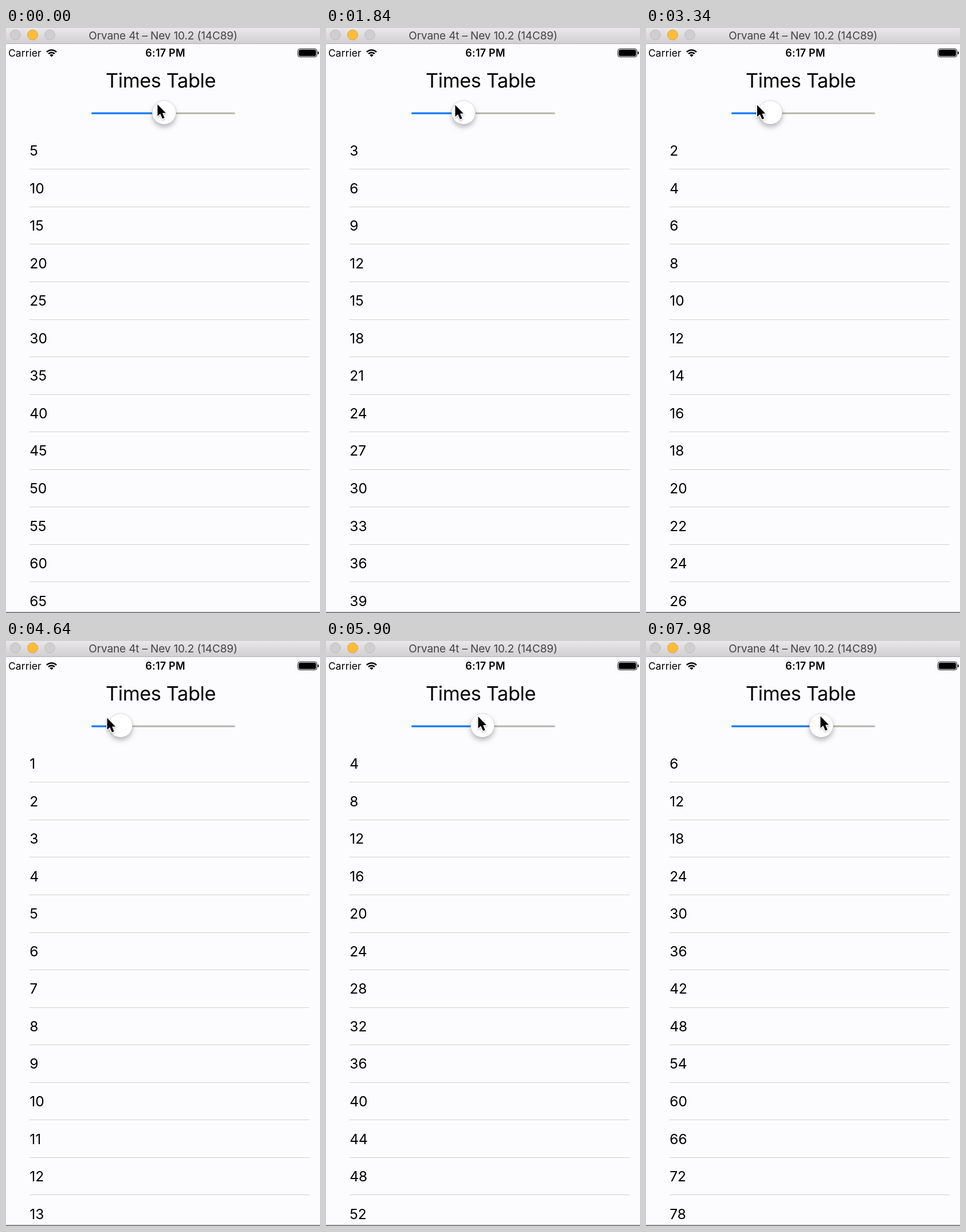
An HTML page with a canvas that plays this animation: 548x1022 px, repeating every 8 s.

```html
<!DOCTYPE html>
<html lang="en">
<head>
<meta charset="utf-8">
<title>Times Table</title>
<style>
html, body { margin: 0; width: 100%; height: 100%; overflow: hidden; background: #fcfcfe; }
canvas { display: block; }
</style>
</head>
<body>
<canvas id="stage" width="548" height="1022"></canvas>
<script>
const ctx = document.getElementById('stage').getContext('2d');
const LOOP = 8000;
const TRACK = { left: 149, right: 400, y: 149 };
const THUMB_R = 21;

// time, thumb centre, pointer x, pointer y
const KEYS = [
  [0, 276, 264.5, 133.5],
  [1840, 240, 225.5, 134.5],
  [3340, 217, 194, 134.5],
  [4640, 200, 176.5, 134.5],
  [5900, 273, 265.5, 132],
  [6980, 297, 295.5, 130.5],
  [7980, 306, 304.5, 131.5]
];

const slope = (i, col) => (KEYS[i + 1][col] - KEYS[i][col]) / (KEYS[i + 1][0] - KEYS[i][0]);

function tangent(i, col) {
  if (i === 0) return slope(0, col);
  if (i === KEYS.length - 1) return slope(i - 1, col);
  const a = slope(i - 1, col), b = slope(i, col);
  return a * b > 0 ? 2 * a * b / (a + b) : 0;
}

// Monotone cubic through the keys
function track(t, col) {
  const last = KEYS.length - 1;
  if (t >= KEYS[last][0]) return KEYS[last][col];
  let i = 0;
  while (t >= KEYS[i + 1][0]) i++;
  const h = KEYS[i + 1][0] - KEYS[i][0], u = (t - KEYS[i][0]) / h, v = 1 - u;
  return KEYS[i][col] * (1 + 2 * u) * v * v + KEYS[i + 1][col] * u * u * (3 - 2 * u)
    + h * (tangent(i, col) * u * v * v - tangent(i + 1, col) * u * u * v);
}

function text(str, x, y, size, { align = 'left', color = '#000', weight = 400, spacing = 0 } = {}) {
  ctx.font = `${weight} ${size}px Inter, Roboto, sans-serif`;
  ctx.letterSpacing = spacing + 'px';
  ctx.textAlign = align;
  ctx.fillStyle = color;
  ctx.fillText(str, x, y);
}

function rect(x, y, w, h, color) {
  ctx.fillStyle = color;
  ctx.fillRect(x, y, w, h);
}

function rounded(x, y, w, h, r) {
  ctx.beginPath();
  ctx.roundRect(x, y, w, h, r);
}

function disc(x, y, r, fill, stroke) {
  ctx.beginPath();
  ctx.arc(x, y, r, 0, 2 * Math.PI);
  ctx.fillStyle = fill;
  ctx.fill();
  if (!stroke) return;
  ctx.strokeStyle = stroke;
  ctx.lineWidth = 1;
  ctx.stroke();
}

function titleBar() {
  const shade = ctx.createLinearGradient(0, 0, 0, 27);
  shade.addColorStop(0, '#e9e7e9');
  shade.addColorStop(1, '#d1cfd1');
  rect(0, 0, 548, 27, shade);
  rect(0, 27, 548, 1, '#b3b1b3');
  disc(16.5, 12, 8.8, '#d0ced0', '#bcbabc');
  disc(46.5, 12, 8.8, '#fdbc38', '#e2a234');
  disc(76.5, 12, 8.8, '#d0ced0', '#bcbabc');
  text('Orvane 4t – Nev 10.2 (14C89)', 274, 19.5, 19, { align: 'center', color: '#444', spacing: -0.15 });
}

function wifi(x, y) {
  const from = -0.75 * Math.PI, to = -0.25 * Math.PI;
  ctx.strokeStyle = ctx.fillStyle = '#000';
  ctx.lineWidth = 2.6;
  for (const r of [12, 7.6]) {
    ctx.beginPath();
    ctx.arc(x, y, r, from, to);
    ctx.stroke();
  }
  ctx.beginPath();
  ctx.moveTo(x, y);
  ctx.arc(x, y, 4.6, from, to);
  ctx.fill();
}

function battery() {
  ctx.strokeStyle = ctx.fillStyle = '#000';
  ctx.lineWidth = 1;
  rounded(509.5, 36.5, 33, 14, 3);
  ctx.stroke();
  rounded(511, 38, 30, 11, 2);
  ctx.fill();
  rounded(544, 41, 2, 5, [0, 2, 2, 0]);
  ctx.fill();
}

function statusBar() {
  text('Carrier', 4, 50, 17.6);
  wifi(79.5, 50.5);
  text('6:17 PM', 278, 50, 18, { align: 'center', weight: 600, spacing: 0.2 });
  battery();
}

function slider(x) {
  const { left, right, y } = TRACK;
  ctx.fillStyle = '#b5b5aa';
  rounded(left, y - 1.5, right - left, 3, 1.5);
  ctx.fill();
  ctx.fillStyle = '#0a7aff';
  rounded(left, y - 1.5, x - left, 3, 1.5);
  ctx.fill();

  ctx.save();
  ctx.shadowColor = 'rgba(0,0,0,.27)';
  ctx.shadowBlur = 9;
  ctx.shadowOffsetY = 5;
  disc(x, 147.5, THUMB_R - 0.3, '#fff');
  ctx.restore();
  disc(x, 147.5, THUMB_R - 0.3, '#fff', 'rgba(0,0,0,.13)');
}

function pointer(x, y) {
  const arrow = new Path2D('M0 0V20.5L4.7 16.3L8.5 25L12.2 23.4L8.5 15H14.5Z');
  ctx.save();
  ctx.translate(x, y);
  ctx.lineJoin = 'round';
  ctx.strokeStyle = '#fff';
  ctx.lineWidth = 3;
  ctx.shadowColor = 'rgba(0,0,0,.25)';
  ctx.shadowBlur = 3;
  ctx.shadowOffsetY = 1.5;
  ctx.stroke(arrow);
  ctx.shadowColor = 'transparent';
  ctx.fillStyle = '#000';
  ctx.fill(arrow);
  ctx.restore();
}

function table(factor) {
  for (let row = 0; row < 13; row++) {
    const y = row * 65.55;
    text(factor * (row + 1), 41.2, Math.round(223 + y), 24.6);
    if (row < 12) rect(41, Math.round(246.3 + y), 489, 1, '#d2d2c7');
  }
}

function draw(now) {
  const t = now % LOOP;
  const thumb = track(t, 1);
  const span = TRACK.right - TRACK.left - 2 * THUMB_R;
  const factor = Math.floor((thumb - TRACK.left - THUMB_R) / span * 10);

  rect(0, 0, 548, 1022, '#fcfcfe');
  titleBar();
  statusBar();
  text('Times Table', 270, 104, 34.3, { align: 'center', spacing: -0.4 });
  table(factor);
  slider(thumb);
  pointer(track(t, 2), track(t, 3));
  rect(0, 1020, 548, 2, '#85838a');
  requestAnimationFrame(draw);
}

requestAnimationFrame(draw);
</script>
</body>
</html>
```
